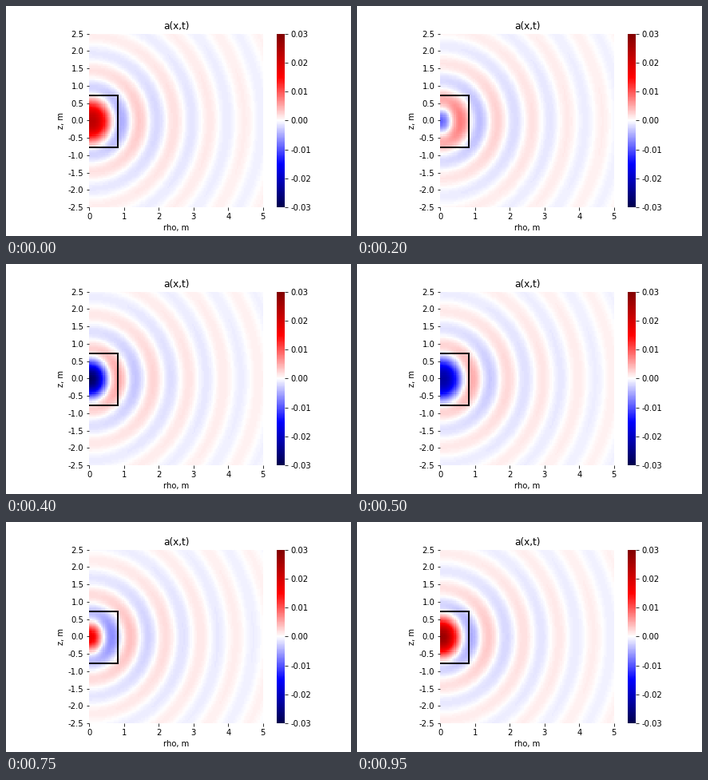
A matplotlib script for the animation above (1 s loop, 432x288 px).

```python
import numpy as np
import matplotlib.pyplot as plt
from matplotlib.animation import FuncAnimation

FRAMES, INTERVAL = 20, 50
K = 2 * np.pi                 # wavelength 1 m, one period per loop
PHASE = 0.45                  # source phase at t = 0, in periods
STRENGTH = 0.66
S_RHO, S_Z = 0.29, 0.34       # widths of the gaussian source
CELLS, STEP = 100, 0.05

plt.rcParams.update({"font.family": "DejaVu Sans", "font.size": 10})


def radial_wave():
    """Outgoing complex wave around a round gaussian source."""
    dr = 0.002
    r = (np.arange(3500) + 0.5) * dr
    # keeps the total source equal to that of the elongated one
    source = STRENGTH * np.exp(-r**2 / (2 * S_RHO**2)) * r * dr
    inner = np.cumsum(np.sin(K * r) * source)
    outer = np.cumsum(np.exp(1j * K * r) * source)
    outer = outer[-1] - outer
    return r, (np.exp(1j * K * r) * inner + np.sin(K * r) * outer) / (K * r)


def wave_field():
    """Stretch the round source along z by summing shifted copies."""
    rho = np.arange(CELLS) * STEP
    z = 2.5 - np.arange(CELLS)[:, None] * STEP
    r, wave = radial_wave()
    spread = np.sqrt(S_Z**2 - S_RHO**2)
    shifts = np.linspace(-3, 3, 25) * spread
    weights = np.exp(-shifts**2 / (2 * spread**2))
    weights *= S_Z / S_RHO / weights.sum()
    return sum(w * np.interp(np.hypot(rho, z - s), r, wave)
               for s, w in zip(shifts, weights))


FIELD = wave_field()


def snapshot(frame):
    t = frame / FRAMES + PHASE
    return (FIELD * np.exp(-2j * np.pi * t)).real


fig, ax = plt.subplots(figsize=(6, 4), dpi=72, facecolor="white")
fig.subplots_adjust(left=0.125, right=0.9, bottom=0.125, top=0.88)

image = ax.imshow(snapshot(0), cmap="seismic", vmin=-0.03, vmax=0.03,
                  extent=(0, 5, -2.5, 2.5), interpolation="nearest")
bar = fig.colorbar(image, ax=ax, ticks=np.linspace(-0.03, 0.03, 7),
                   format="%.2f")
bar.outline.set_visible(False)
ax.spines[:].set_visible(False)

# Source region, drawn through the cell centres
half = STEP / 2
right, top, bottom = 0.8 + half, 0.75 - half, -0.75 - half
ax.plot([0, right, right, 0], [top, top, bottom, bottom], "k", lw=2,
        solid_joinstyle="miter", solid_capstyle="butt")
ax.set(xlim=(0, 5), ylim=(-2.5, 2.5), title="a(x,t)",
       xlabel="rho, m", ylabel="z, m")

heights = np.linspace(-2.5, 2.5, 11)
ax.set_xticks(range(6))
ax.set_yticks(heights, [str(h) for h in heights.tolist()])


def update(frame):
    image.set_data(snapshot(frame))
    return [image]


anim = FuncAnimation(fig, update, frames=FRAMES, interval=INTERVAL,
                     init_func=lambda: update(0), repeat=True, repeat_delay=0)
plt.show()
```
